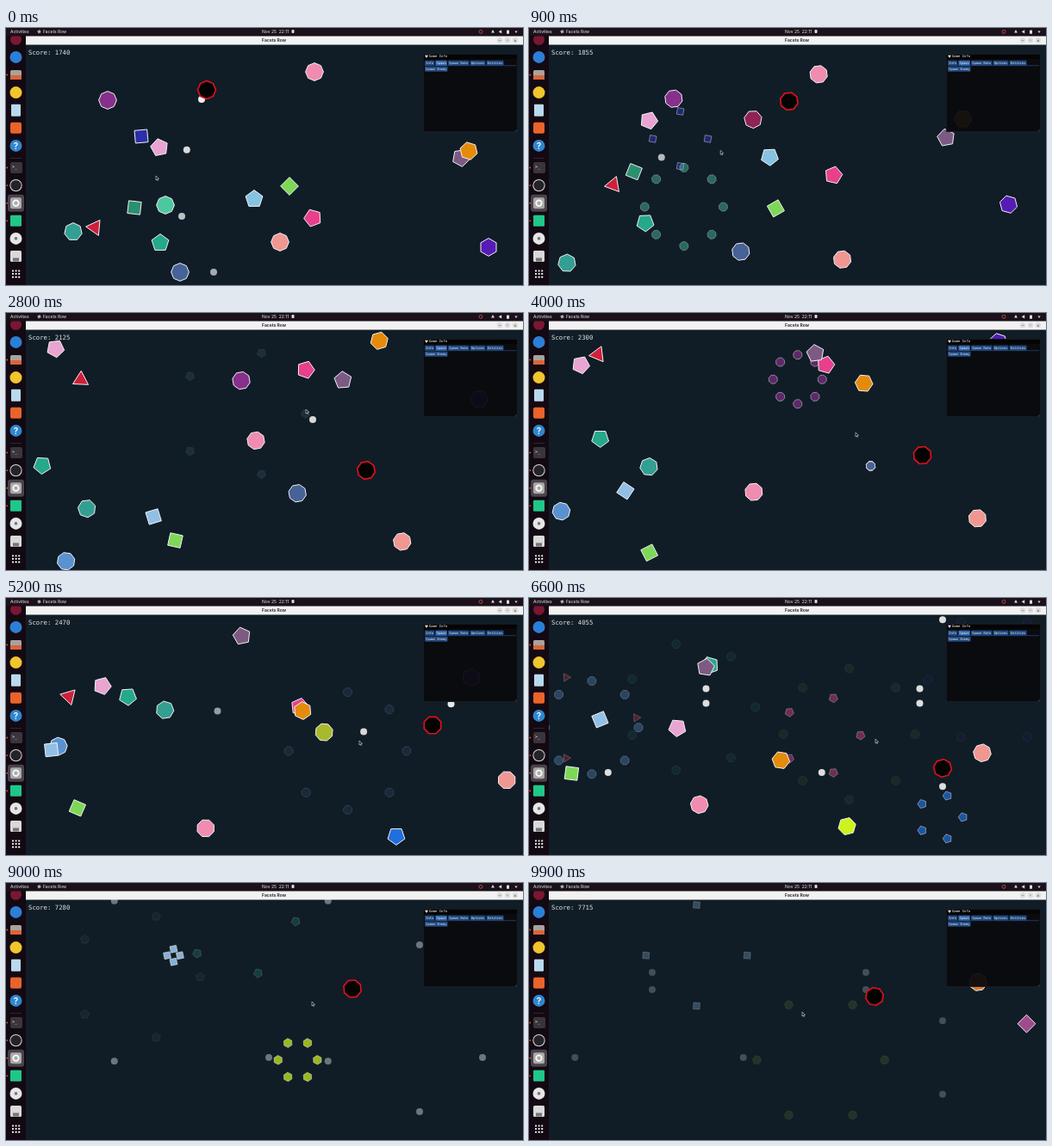
These frames come from a looping animation (600 px wide and 299 px high, 10 s). An HTML page with a canvas:

```html
<!DOCTYPE html>
<html lang="en">
<head>
<meta charset="utf-8">
<title>Facets Row</title>
<style>
html, body { margin: 0; width: 100%; height: 100%; overflow: hidden; background: #101d27; }
canvas { display: block; }
</style>
</head>
<body>
<canvas width="600" height="299"></canvas>
<script>
const ctx = document.querySelector('canvas').getContext('2d');
const TITLE = 'Facets Row', MONO = '"DejaVu Sans Mono", monospace', SANS = 'Inter, sans-serif';
const ENEMY_SPEED = 55.4, BULLET_SPEED = 727, DEBRIS_SPEED = 57, SPIN = 117;
const DEBRIS_LIFE = 1.45, BULLET_LIFE = .85, BURST_LIFE = 5;
const BURST = { t: 6.066, x: 480, y: 203 };
const rad = deg => deg * Math.PI / 180;

// Time, player x and y, mouse x and y, score.
const keys = [
  [0, 233, 72, 175, 173, 1740],
  [1.7, 363, 97, 266, 117, 1955],
  [2.8, 418, 183, 349, 113, 2125],
  [5.2, 495, 148, 411, 167, 2470],
  [6.6, 480, 198, 403, 165, 4055],
  [8.1, 403, 114, 394, 127, 6840],
  [9.9, 401, 132, 318, 151, 7715],
];

function stateAt(t) {
  const i = Math.max(1, keys.findIndex(k => k[0] >= t)), a = keys[i - 1], b = keys[i];
  const k = Math.max(0, (t - a[0]) / (b[0] - a[0]));
  const [, px, py, mx, my, score] = a.map((v, j) => v + (b[j] - v) * k);
  return { px, py, mx, my, score: Math.round(score / 5) * 5 };
}

// Position of a point that bounces between two walls.
function fold(v, a, b) {
  const w = b - a, u = (((v - a) % (2 * w)) + 2 * w) % (2 * w);
  return a + (u > w ? 2 * w - u : u);
}

const enemies = [], shots = [];

// A bullet that left the player so as to reach (x, y) at the given time.
function shoot(at, x, y, end) {
  const { px, py } = stateAt(at);
  shots.push({ at, x, y, px, py, end, fire: at - Math.hypot(x - px, y - py) / BULLET_SPEED });
}

function place(e, t) {
  const d = ENEMY_SPEED * (t - Math.max(0, e.born)), a = rad(e.heading);
  return [fold(e.x + d * Math.cos(a), 33, 589), fold(e.y + d * Math.sin(a), 30, 289)];
}

// Every enemy is born point up and spins; those killed before the burst are shot.
function add(n, color, x, y, heading, died, born = 0) {
  const e = { n, color, x, y, heading, died, born };
  enemies.push(e);
  if (died < BURST.t - .5) shoot(died, ...place(e, died), died);
}

add(8, '#f08cb0', 358, 51, -116, 6.62);
add(8, '#86308c', 118, 84, -2, 3.5);
add(4, '#2b2fa8', 157, 126, 9, .34, -.34);
add(5, '#e9a4d2', 178, 139, -141, 6.65, -.52);
add(4, '#2a9070', 149, 209, -123, .95, -.44);
add(8, '#4cc8a0', 185, 206, 158, .1);
add(5, '#86c3e2', 288, 199, -100, 1.5);
add(4, '#7dd857', 329, 184, 148.7, 6.62);
add(5, '#e8408c', 356, 221, -93, 5.8, -.44);
add(7, '#339f92', 78, 237, 133, 5.28);
add(3, '#cf1f3a', 103, 232, -96, 5.65, -.3);
add(5, '#26a88a', 179, 250, -152, 7.89);
add(8, '#f09792', 318, 249, 24, 7.32);
add(8, '#466296', 202, 284, -28.6, 4);
add(6, '#561bb5', 560, 255, -94, 5.25);
add(5, '#7d5a84', 528, 151, -152, 7.7, -.24);
add(6, '#e58b0c', 537, 143, -132, 6.62, -.4);
add(7, '#8f2257', 266, 97, 123, 1.35, .7);
add(8, '#5a92d0', 118, 202, 119, 5.65, 1);
add(4, '#92bfe6', 183, 243, -153, 8.87, 2.56);
add(8, '#a9b92e', 329, 118, 43.5, 5.26, 4.2);
add(5, '#1f6fdf', 429, 232, 62, 6.14, 4.28);
add(6, '#cdf21c', 379, 231, 106, 8.6, 5.95);
add(4, '#a04a8c', 572, 132, 48, 11, 9.13);
add(8, '#dc7a30', 506, 92, 57, 11, 9.4);

shoot(0, 227, 83, .4);
shoot(0, 204, 219, .2);
shoot(0, 241, 284, .1);
shoot(1.7, 291, 107, 2.1);
shoot(2.8, 356, 124, 3.2);

function rect(x, y, w, h, color) {
  ctx.fillStyle = color;
  ctx.fillRect(x, y, w, h);
}

function box(x, y, w, h, r, color) {
  ctx.fillStyle = color;
  ctx.beginPath();
  ctx.roundRect(x, y, w, h, r);
  ctx.fill();
}

function disc(x, y, r, color) {
  ctx.fillStyle = color;
  ctx.beginPath();
  ctx.arc(x, y, r, 0, 7);
  ctx.fill();
}

function ring(x, y, r, color, width) {
  ctx.strokeStyle = color;
  ctx.lineWidth = width;
  ctx.beginPath();
  ctx.arc(x, y, r, 0, 7);
  ctx.stroke();
}

function path(points, fill, stroke, width) {
  ctx.beginPath();
  points.forEach(p => ctx.lineTo(...p));
  ctx.closePath();
  ctx.fillStyle = fill;
  ctx.fill();
  if (!stroke) return;
  ctx.strokeStyle = stroke;
  ctx.lineWidth = width;
  ctx.stroke();
}

// The n points around a centre, the first one at the given angle.
function around(x, y, r, n, deg) {
  return Array.from({ length: n }, (_, i) => {
    const a = rad(deg + i * 360 / n);
    return [x + r * Math.cos(a), y + r * Math.sin(a)];
  });
}

function polygon(x, y, r, n, deg, fill, stroke, width) {
  path(around(x, y, r, n, deg), fill, stroke, width);
}

function text(s, x, y, size, color, family = SANS, weight = 400, align = 'left') {
  ctx.font = `${weight} ${size}px ${family}`;
  ctx.textAlign = align;
  ctx.fillStyle = color;
  ctx.fillText(s, x, y);
}

function drawEnemy(e, t) {
  const age = t - e.died, turn = SPIN * (t - e.born) - 90;
  if (t < e.born || age >= DEBRIS_LIFE) return;
  if (age < 0) {
    polygon(...place(e, t), 10.4, e.n, turn, e.color, '#f2f2f2', 1);
    return;
  }
  ctx.globalAlpha = 1 - age / DEBRIS_LIFE;
  for (const [x, y] of around(...place(e, e.died), age * DEBRIS_SPEED, e.n, 0))
    polygon(x, y, 5.3, e.n, turn, e.color, '#d8d8d8', .8);
  ctx.globalAlpha = 1;
}

function drawShots(t) {
  for (const s of shots) {
    const age = t - s.fire, k = age / (s.at - s.fire);
    if (age < 0 || t >= s.end) continue;
    ctx.globalAlpha = Math.max(0, 1 - age / BULLET_LIFE);
    disc(s.px + (s.x - s.px) * k, s.py + (s.y - s.py) * k, 4, '#f4f4f4');
  }
  const age = t - BURST.t;
  if (age > 0) {
    ctx.globalAlpha = 1 - age / BURST_LIFE;
    for (const [x, y] of around(BURST.x, BURST.y, BULLET_SPEED * age, 8, 0))
      disc(fold(x, 27, 604), fold(y, 17, 300), 4, '#f4f4f4');
  }
  ctx.globalAlpha = 1;
}

function drawPanel() {
  rect(484, 30, 110, 91, 'rgba(9,10,13,.94)');
  rect(484, 30, 110, 6, '#050506');
  ctx.strokeStyle = '#2b2d35';
  ctx.lineWidth = .5;
  ctx.strokeRect(484.2, 30.2, 109.5, 90.6);
  polygon(488, 32.8, 2.2, 3, 90, '#fff');
  text('Game Info', 491, 34, 3.9, '#fff', MONO);
  rect(486, 43.6, 106, .5, '#3568ae');
  const tab = (label, x, y) => {
    const w = label.length * 2.2 + 2.4;
    box(x, y, w, 6, .8, label === 'Spawn' ? '#3568ae' : '#234a80');
    text(label, x + w / 2, y + 4.2, 3.65, '#e8eef8', MONO, 400, 'center');
    return x + w + 1.2;
  };
  ['Info', 'Spawn', 'Spawn Rate', 'Options', 'Entities'].reduce((x, label) => tab(label, x, 37.7), 486);
  tab('Spawn Enemy', 486, 44.8);
  polygon(592, 119.5, 1.8, 3, 45, '#22334a');
}

// Dock icons stand in evenly spaced slots.
const icons = [
  y => disc(11.5, y, 6.5, '#7a1733'),
  y => disc(11.5, y, 7, '#2c7fd6'),
  y => { box(5, y - 5.5, 13, 11, 1.5, '#a9a29d'); rect(5, y + .5, 13, 5, '#d9663a'); },
  y => disc(11.5, y, 7, '#f0c52e'),
  y => box(6, y - 7, 11, 14, 1, '#b9d9ee'),
  y => box(5, y - 6.5, 13, 13, 2, '#e8642a'),
  y => { disc(11.5, y, 7, '#2f86cf'); text('?', 11.5, y + 3.7, 10, '#fff', SANS, 600, 'center'); },
  y => { box(5, y - 6.5, 14, 13, 2, '#3a353c'); text('>_', 7, y + .5, 5, '#fff', MONO); },
  y => { disc(11.5, y, 7.2, '#d8d8d8'); disc(11.5, y, 6.2, '#25232a'); },
  y => {
    box(2, y - 10, 19, 20, 3, '#4b424b');
    box(5, y - 6.5, 13, 13, 2, '#a9a9a9');
    ring(11.5, y, 3.2, '#f5f5f5', 2);
  },
  y => box(5, y - 6.5, 13, 13, 1, '#20c78a'),
  y => { disc(11.5, y, 7, '#e6e6e6'); disc(11.5, y, 1.8, '#77757a'); },
  y => { box(5, y - 6.5, 13, 13, 1.5, '#d9d9d9'); rect(8, y + 2, 7, 4, '#77757a'); },
  y => { for (let i = 0; i < 9; i++) box(7 + i % 3 * 3.6, y - 4.6 + Math.floor(i / 3) * 3.6, 2, 2, .5, '#f2f2f2'); },
];

function drawDock() {
  rect(0, 8, 23, 291, '#130912');
  rect(5, 151, 13, .6, '#453744');
  icons.forEach((icon, i) => {
    const y = 13.3 + i * 20.6 + (i > 6 ? 5 : 0);
    icon(y);
    if ([2, 7, 8, 9, 10].includes(i)) disc(1.3, y, .9, '#e95420');
  });
}

function drawBars() {
  rect(0, 0, 600, 9.5, '#1b111a');
  text('Activities', 5, 6, 5, '#eee');
  polygon(38.5, 4.3, 2.4, 4, 20, '#aaa');
  text(TITLE, 43, 6, 5, '#eee');
  text('Nov 25  22:11', 297, 6, 5, '#eee');
  box(331.5, 2, 3, 4, 1, '#ddd');
  ring(551, 4.3, 2, '#d6534c', .8);
  polygon(565, 4.3, 2.2, 3, -90, '#ddd');
  polygon(574, 4.3, 2.4, 3, 180, '#ddd');
  box(581, 2.5, 3, 4.3, .6, '#ddd');
  polygon(592, 4.3, 1.8, 3, 90, '#ddd');
  rect(23, 9.5, 577, 10, '#f2f2f2');
  text(TITLE, 311, 16, 5, '#333', SANS, 700, 'center');
  ['–', '▫', '×'].forEach((sign, i) => {
    disc(573 + i * 9, 14.2, 3.2, '#dedede');
    text(sign, 573 + i * 9, 16, 5, '#444', SANS, 400, 'center');
  });
}

function drawCursor(x, y) {
  path([[0, 0], [0, 5], [1.3, 3.9], [2.2, 5.6], [2.2, 3.5], [3.5, 3.4]]
    .map(([dx, dy]) => [x - 1 + dx, y - 1 + dy]), '#111', '#ddd', .6);
}

function draw(t) {
  const { px, py, mx, my, score } = stateAt(t);
  rect(0, 0, 600, 299, '#101d27');
  enemies.forEach(e => drawEnemy(e, t));
  drawShots(t);
  polygon(px, py, 10.5, 8, SPIN * t, '#030303', '#d8121c', 1.7);
  text('Score: ' + score, 26, 30.8, 7.3, '#e4e4e4', MONO);
  drawPanel();
  drawCursor(mx, my);
  drawDock();
  drawBars();
}

const start = performance.now();
function frame() {
  draw(Math.floor((performance.now() - start) / 100) % 100 / 10);
  requestAnimationFrame(frame);
}
frame();
</script>
</body>
</html>
```
